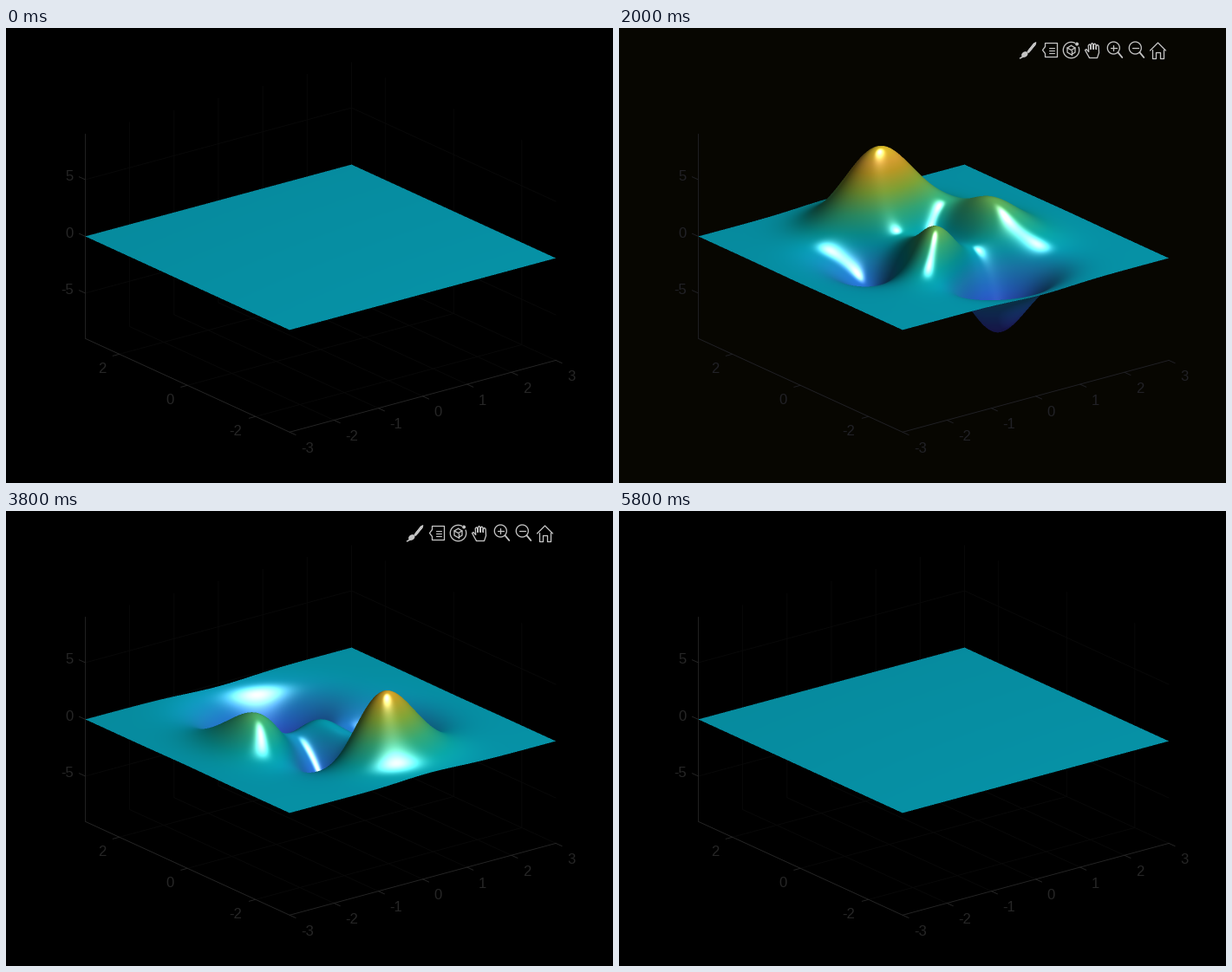
A matplotlib script that plays this animation: 700x525 px, repeating every 6 s.

```python
import numpy as np
import matplotlib.pyplot as plt
from matplotlib.animation import FuncAnimation
from matplotlib.colors import LinearSegmentedColormap
from matplotlib.patches import Arc, Circle, Ellipse

W, H, DPI = 700, 525, 100
FRAMES, INTERVAL = 30, 200
PX = 72 / DPI

# Orthographic view of a unit box, stretched to the axes
AZ, EL = np.radians(-37.5), np.radians(30)
SX, SY = 387.0, 272.2
ORIGIN = np.array([362.75, 253.0])
EX = np.array([SX * np.cos(AZ), SY * np.sin(AZ) * np.sin(EL)]) / 6
EY = np.array([SX * np.sin(AZ), -SY * np.cos(AZ) * np.sin(EL)]) / 6
EZ = np.array([0, -SY * np.cos(EL)]) / 18
TO_GROUND = np.linalg.inv(np.column_stack([EX, EY]))

CMAP = LinearSegmentedColormap.from_list("height", [
    (0, "#3e26a8"), (.125, "#484df0"), (.25, "#327cfc"), (.365, "#23a0e5"),
    (.444, "#08b5d0"), (.492, "#0bbdbd"), (.587, "#3fca8e"), (.698, "#9dc943"),
    (.794, "#e6bb2d"), (.841, "#febe3c"), (.952, "#f5e924"), (1, "#f9fb15")], N=1024)
Z_MIN, Z_MAX = -6.55, 8.106
AMBIENT, DIFFUSE, SPECULAR, SHINE = 0.3, 0.6, 0.9, 10

# The light sits 30 degrees right of and above the camera, in the camera's own frame
EYE = np.array([np.sin(AZ) * np.cos(EL), -np.cos(AZ) * np.cos(EL), np.sin(EL)])
RIGHT = np.array([np.cos(AZ), np.sin(AZ), 0])
UP = np.cross(EYE, RIGHT)
TURN = np.radians(30)
LIGHT = 8.66 * (np.cos(TURN) * (np.cos(TURN) * EYE + np.sin(TURN) * RIGHT)
                + np.sin(TURN) * UP)


def project(x, y, z=0):
    return ORIGIN + x * EX + y * EY + z * EZ


def peaks(x, y):
    """Height and both slopes."""
    e = np.exp(-x**2 - y**2)
    q = x / 5 - x**3 - y**5
    e1 = 3 * np.exp(-x**2 - (y + 1)**2)
    a = e1 * (1 - x)**2
    b = -10 * q * e
    c = -np.exp(-(x + 1)**2 - y**2) / 3
    zx = (-2 * e1 * (1 - x) - 2 * x * a
          - 10 * e * (0.2 - 3 * x**2) - 2 * x * b - 2 * (x + 1) * c)
    zy = -2 * (y + 1) * a + 50 * y**4 * e - 2 * y * b - 2 * y * c
    return a + b + c, zx, zy


def shade(x, y, amp):
    z, zx, zy = (amp * p for p in peaks(x, y))
    n = np.stack([-zx / 3, -zy / 3, np.ones_like(z)])
    n /= np.sqrt((n**2).sum(0))
    n *= np.where(EYE @ n < 0, -1, 1)
    light = LIGHT[:, None] - np.stack([x / 6, y / 6, z / 18])
    light /= np.sqrt((light**2).sum(0))
    ndl = (n * light).sum(0)
    mirror = np.clip(2 * ndl * (EYE @ n) - EYE @ light, 0, 1)
    glint = SPECULAR * np.where(ndl > 0, mirror**SHINE, 0)
    lit = AMBIENT + DIFFUSE * np.clip(ndl, 0, None)
    base = CMAP((z - Z_MIN) / (Z_MAX - Z_MIN))[:, :3]
    return np.clip(base * lit[:, None] + glint[:, None], 0, 1)


# Supersampled screen columns; t runs from the near edge (0) to the far edge (1)
SS = 2
X0, X1, Y0, Y1 = 90, 636, 100, 385
cols = X0 + (np.arange((X1 - X0) * SS) + 0.5) / SS
rows = Y0 + (np.arange((Y1 - Y0) * SS) + 0.5) / SS
left, front, right, back = (project(*p) for p in [(-3, 3), (-3, -3), (3, -3), (3, 3)])
near = np.interp(cols, *np.transpose([left, front, right]))
far = np.interp(cols, *np.transpose([left, back, right]))
inside = np.flatnonzero((cols > left[0]) & (cols < right[0]))
t = np.linspace(0, 1, 420)


def ground(u, v):
    return TO_GROUND @ np.stack([u - ORIGIN[0], v - ORIGIN[1]])


sheet_v = near[:, None] + t * (far - near)[:, None]
sheet_u = np.broadcast_to(cols[:, None], sheet_v.shape)
sheet_z = peaks(*ground(sheet_u.ravel(), sheet_v.ravel()))[0].reshape(sheet_v.shape)


def render(amp):
    r = sheet_v + EZ[1] * amp * sheet_z
    top = np.minimum.accumulate(r, axis=1)
    low = np.maximum.accumulate(r, axis=1)
    hit = np.full((len(cols), len(rows)), np.nan)
    for j in inside:
        hit[j] = np.interp(rows, top[j, ::-1], t[::-1], left=np.nan, right=np.nan)
        if low[j, -1] > r[j, 0]:
            under = rows > r[j, 0]
            hit[j, under] = np.interp(rows[under], low[j], t, right=np.nan)
    seen = ~np.isnan(hit)
    j = np.nonzero(seen)[0]
    v = near[j] + hit[seen] * (far - near)[j]
    rgba = np.zeros(hit.shape + (4,))
    rgba[seen, :3] = shade(*ground(cols[j], v), amp)
    rgba[seen, 3] = 1
    rgba = rgba.reshape(X1 - X0, SS, Y1 - Y0, SS, 4).mean((1, 3))
    rgba[..., :3] /= np.maximum(rgba[..., 3:], 1e-6)
    return np.clip(rgba, 0, 1).transpose(1, 0, 2)


fig = plt.figure(figsize=(W / DPI, H / DPI), dpi=DPI, facecolor="black")
ax = fig.add_axes([0, 0, 1, 1])
ax.set_axis_off()

INK, GRID, ICON = "#262626", "#090909", "#c4c4c4"
grid, ink, tools = [], [], []


def line(points, color, width=0.9, **kw):
    return ax.plot(*np.transpose(points), color=color, lw=width * PX, **kw)[0]


def grid_line(*pts):
    grid.append(line([project(*p) for p in pts], GRID, zorder=1))


def axis_line(*pts):
    ink.append(line(pts, INK, zorder=2))


def tick(value, p, step, offset, ha):
    axis_line(p, p + step)
    x, y = p + offset
    ink.append(ax.text(x, y, str(value), color=INK, ha=ha, va="baseline",
                       family="Liberation Sans", size=16.67 * PX, zorder=2))


for k in range(-2, 4):
    grid_line((k, -3, -9), (k, 3, -9), (k, 3, 9))
for k in (-2, 0, 2):
    grid_line((-3, k, -9), (3, k, -9), (3, k, 9))
for k in (-5, 0, 5):
    grid_line((-3, 3, k), (3, 3, k), (3, -3, k))

axis_line(project(-3, 3, 9), project(-3, 3, -9), project(-3, -3, -9), project(3, -3, -9))
for k in range(-3, 4):
    tick(k, project(k, -3, -9), (7, 3.2), (13, 23.5), "left")
for k in (-2, 0, 2):
    tick(k, project(-3, k, -9), (-7.4, 2), (-15.5, 21.7), "right")
for k in (-5, 0, 5):
    tick(k, project(-3, 3, k), (-7, -3.2), (-13.5, 1.5), "right")


# Toolbar icons
def stroke(pts, width=1.3):
    tools.append(line(pts, ICON, width, zorder=4, solid_capstyle="round"))


def shape(patch):
    patch.set_zorder(4)
    tools.append(ax.add_patch(patch))


def arc(x, y, r, start=0, end=360):
    shape(Arc((x, y), 2 * r, 2 * r, theta1=start, theta2=end, ec=ICON, lw=1.3 * PX))


def mirrored(cx, half):
    return half + [(2 * cx - x, y) for x, y in half[::-1]]


def brush(x, y):
    for f in np.linspace(0, 1, 8):
        stroke([(x + 10 - 2 * f, y - 9 + 2.4 * f), (x + 10 - 9 * f, y - 9 + 11 * f)], 1 + 2 * f)
    shape(Ellipse((x - 3.2, y + 5), 8, 6, angle=-35, fc=ICON, ec="none"))
    stroke([(x - 8.5, y + 9.4), (x - 4, y + 7)], 1.6)


def note(x, y):
    stroke([(x - 6, y - 4), (x - 6, y - 8), (x + 8, y - 8), (x + 8, y + 8), (x - 6, y + 8),
            (x - 6, y + 4), (x - 9, y), (x - 6, y - 4)])
    for dy in (-3, 0, 3):
        stroke([(x - 2, y + dy), (x + 4.5, y + dy)], 1.1)


def orbit(x, y):
    arc(x, y, 9.2, -25, 300)
    shape(Circle((x + 6.6, y - 7), 2, fc=ICON, ec="none"))
    a = np.arange(7) * np.pi / 3
    cube = np.column_stack([x + 5.2 * np.sin(a), y - 5.2 * np.cos(a)])
    stroke(cube)
    for corner in cube[1::2]:
        stroke([(x, y), corner])


def hand(x, y):
    pts = [(x - 4, y + 9), (x - 9, y), (x - 7.5, y - 1), (x - 4.8, y + 2)]
    for i in range(4):
        fx, tip = x - 4 + 3.1 * i, y - 8.5 + abs(i - 1.3) * 1.4
        pts += [(fx - 1.3, tip + 1.4), (fx, tip), (fx + 1.3, tip + 1.4), (fx + 1.5, y - 1)]
    stroke(pts + [(x + 7, y + 3), (x + 5, y + 9), (x - 4, y + 9)])


def zoom(x, y, plus):
    arc(x, y, 7)
    stroke([(x - 3.3, y), (x + 3.3, y)])
    if plus:
        stroke([(x, y - 3.3), (x, y + 3.3)])
    stroke([(x + 5.2, y + 5.2), (x + 10, y + 11)], 1.8)


def home(x, y):
    stroke([(x - 9, y), (x, y - 9), (x + 9, y)])
    stroke(mirrored(x, [(x - 6.7, y - 1.5), (x - 6.7, y + 8.5),
                        (x - 2.3, y + 8.5), (x - 2.3, y + 2)]))


brush(471, 25.5)
note(497.5, 25.5)
orbit(521.5, 25.5)
hand(546.5, 25.5)
zoom(570.3, 23, True)
zoom(595.3, 23, False)
home(621.5, 26)

surface = ax.imshow(np.zeros((Y1 - Y0, X1 - X0, 4)), extent=(X0, X1, Y1, Y0),
                    interpolation="nearest", zorder=3)
ax.set_xlim(0, W)
ax.set_ylim(H, 0)
ax.set_aspect("auto")


def update(i):
    amp = np.sin(2 * np.pi * i / (FRAMES - 1))
    surface.set_data(render(amp))
    tinted = amp > 0.65
    fig.set_facecolor("#070601" if tinted else "black")
    for a in ink:
        a.set_color("#212126" if tinted else INK)
    for a in grid:
        a.set_visible(not tinted)
    for a in tools:
        a.set_visible(3 <= i <= 11 or 18 <= i <= 20)
    return [surface]


anim = FuncAnimation(fig, update, frames=FRAMES, interval=INTERVAL, repeat=True,
                     repeat_delay=0, blit=False)
plt.show()
```
